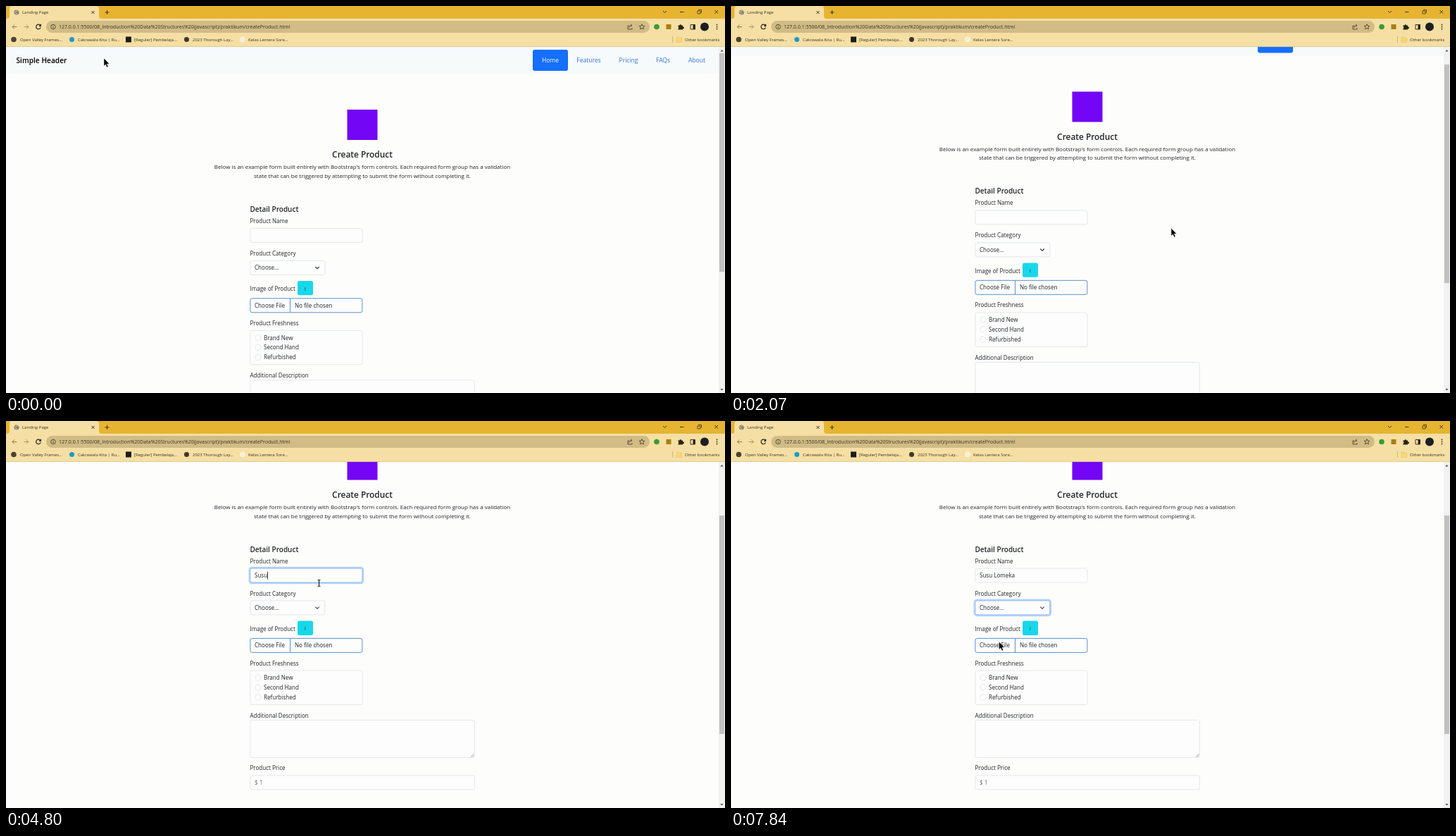
These frames come from a looping animation (1021x549 px, 8000 ms). An HTML page:

```html
<!DOCTYPE html>
<html lang="en">
<head>
<meta charset="utf-8">
<title>Landing Page</title>
<style>
html, body { margin: 0; width: 100%; height: 100%; overflow: hidden; background: #fdfdfb; }
svg { display: block; width: 100vw; height: 100vh; font: 8.05px "Open Sans", "Noto Sans", sans-serif; }
text { fill: #212529; white-space: pre; }
.mid { text-anchor: middle; }
.heading { font-weight: 600; }
.nav text { font-size: 8.55px; fill: #2f74dc; text-anchor: middle; }
.nav .active { fill: #fff; }
.field { fill: #fdfdfd; stroke: #dee2e6; stroke-width: .8; }
.ring { fill: none; stroke: #0d6efd; stroke-opacity: .28; stroke-width: 2.2; }
.edge { fill: none; stroke: #86b7fe; stroke-width: .8; }
.small text { font-size: 6px; fill: #3a3220; }
.icon { fill: none; stroke: #3f361f; stroke-width: 1; }
</style>
</head>
<body>
<svg viewBox="0 0 1021 549">
  <rect width="1021" height="549" fill="#fdfdfb"/>

  <g id="page">
    <rect y="58" width="1012" height="38" fill="#f6fafb"/>
    <text class="heading" x="14.5" y="81" font-size="10.2" style="fill:#000">Simple Header</text>
    <g class="nav">
      <rect x="748" y="62" width="50" height="30" rx="3" fill="#156ffa"/>
      <text class="active" x="773" y="80">Home</text>
      <text x="827.5" y="80">Features</text>
      <text x="884" y="80">Pricing</text>
      <text x="933" y="80">FAQs</text>
      <text x="981" y="80">About</text>
    </g>

    <rect x="484.5" y="147" width="43" height="43" fill="#7206f5"/>
    <text class="heading mid" x="506" y="215.3" font-size="11.9">Create Product</text>
    <text class="mid" x="506" y="231.3" font-size="8">Below is an example form built entirely with Bootstrap's form controls. Each required form group has a validation</text>
    <text class="mid" x="506" y="244" font-size="8">state that can be triggered by attempting to submit the form without completing it.</text>

    <text class="heading" x="346.5" y="292" font-size="10">Detail Product</text>
    <text x="346.5" y="308">Product Name</text>
    <rect class="field" x="346.8" y="315.4" width="159.2" height="20" rx="2.5"/>
    <g id="nameFocus">
      <rect class="ring" x="345.6" y="314.2" width="161.6" height="22.4" rx="3.5"/>
      <rect class="edge" x="346.8" y="315.4" width="159.2" height="20" rx="2.5"/>
    </g>
    <text id="typed" x="353" y="328.5"></text>
    <rect id="caret" y="320" width=".8" height="11" fill="#111"/>

    <text x="346.5" y="354">Product Category</text>
    <rect class="field" x="346.8" y="361.3" width="106" height="20" rx="2.5"/>
    <g id="selectFocus">
      <rect class="ring" x="345.6" y="360.1" width="108.4" height="22.4" rx="3.5"/>
      <rect class="edge" x="346.8" y="361.3" width="106" height="20" rx="2.5"/>
    </g>
    <text x="353" y="374.4">Choose...</text>
    <path d="M439.3 370l2.7 2.7 2.7-2.7" fill="none" stroke="#343a40" stroke-width="1.1"/>

    <text x="346.5" y="404.3">Image of Product</text>
    <rect x="414" y="390" width="22" height="20.3" rx="2.5" fill="#18d7ea"/>
    <text class="mid" x="425" y="403.6" font-size="7">i</text>
    <rect x="346.9" y="414.8" width="159" height="20" rx="2.5" fill="#fdfdfd" stroke="#4a84c4" stroke-width=".9"/>
    <path d="M403.5 415v19.6" stroke="#4a84c4" stroke-width=".9"/>
    <text x="353" y="427.8">Choose File</text>
    <text x="410" y="427.8">No file chosen</text>

    <text x="346.5" y="453">Product Freshness</text>
    <rect class="field" x="346.8" y="460.4" width="159.2" height="48.4" rx="2.5"/>
    <g class="field">
      <circle cx="358" cy="470.4" r="4.2"/>
      <circle cx="358" cy="484.3" r="4.2"/>
      <circle cx="358" cy="498.2" r="4.2"/>
    </g>
    <text x="366" y="473.5">Brand New</text>
    <text x="366" y="487.4">Second Hand</text>
    <text x="366" y="501.3">Refurbished</text>

    <text x="346.5" y="527.2">Additional Description</text>
    <rect class="field" x="346.8" y="530.8" width="318.6" height="53" rx="2.5"/>
    <path d="M660 583l4.5-4.5M662.5 583l2-2" stroke="#777" stroke-width=".7"/>
    <text x="346.5" y="601.8">Product Price</text>
    <rect class="field" x="346.8" y="609.3" width="318.6" height="20" rx="2.5"/>
    <text x="353" y="622.5" style="fill:#6c757d">$ 1</text>
  </g>

  <rect x="1012" y="58" width="9" height="491" fill="#f1f1f0"/>
  <rect id="thumb" x="1013" y="67" width="7" height="310" fill="#c0c0c0"/>
  <path d="M1014.3 64.500h4.400l-2.200-2.500zM1014.300 543h4.400l-2.200 2.500z" fill="#555"/>

  <g id="browser">
    <rect width="1021" height="18" fill="#e7b432"/>
    <path d="M1 18q4 0 4-4V4q0-4 4-4h119q4 0 4 4v10q0 4 4 4z" fill="#f5dfa4"/>
    <rect y="18" width="1021" height="40" fill="#f5dfa4"/>
    <path d="M0 57.600h1021" stroke="#d9c58e" stroke-width=".8"/>
    <rect x="57" y="21" width="857" height="17" rx="8.500" fill="#d1bc86"/>

    <g class="small">
      <circle cx="15" cy="9" r="3.600" fill="#85816f"/>
      <path d="M12 8q2 2 3-1t3 1M13 11h3" fill="none" stroke="#f5dfa4" stroke-width=".8"/>
      <text x="23" y="11.300">Landing Page</text>
      <text x="75" y="32" style="font-size:7px">127.0.0.1:5500/08_Introduction%20Data%20Structures%20(javascript)/praktikum/createProduct.html</text>
      <circle cx="11" cy="47.500" r="3.800" fill="#4a4232"/>
      <text x="20" y="50">Open Valley Frames...</text>
      <circle cx="93.500" cy="47.500" r="3.500" fill="#1a9cc4"/>
      <text x="102" y="50">Cakrawala Kita | Ru...</text>
      <rect x="170" y="43.500" width="8" height="8" fill="#1d1b17"/>
      <text x="182" y="50">[Reguler] Pembelaja...</text>
      <circle cx="256.500" cy="47.500" r="3.500" fill="#40382a"/>
      <text x="265" y="50">2023 Thorough Lay...</text>
      <circle cx="336" cy="47.500" r="4.200" fill="#f9efd2"/>
      <text x="344" y="50">Kelas Lentera Sore...</text>
      <path d="M946.500 43v9" stroke="#c6ae72" stroke-width=".8"/>
      <path d="M952 44h3l1 1h3.500v6.500H952z" fill="#f8d775" stroke="#e4bd50" stroke-width=".5"/>
      <text x="964" y="50">Other bookmarks</text>
    </g>

    <g class="icon">
      <path d="M121.500 7l4 4m0-4l-4 4M140.500 9h6m-3-3v6M933 7l2.500 2.500L938 7M957 8.500h5.500M1006.500 6l4.500 4.500m0-4.500l-4.500 4.500"/>
      <path d="M982 7h4v4h-4zM983.500 6.500v-1.200h4v4h-1.200" stroke-width=".8"/>
      <path d="M15.500 29.500H9m3-3l-3 3 3 3" stroke="#8d7b4c"/>
      <path d="M25.500 29.500H32m-3-3l3 3-3 3" stroke="#a9965f"/>
      <path d="M48.800 27.600a3.300 3.300 0 1 0 .4 2.800M49.400 25.800v2.500h-2.500" stroke="#211c10" stroke-width="1.200"/>
      <circle cx="67" cy="29.500" r="3.300" stroke-width=".8"/>
      <path d="M67 29v2.300M67 27.200v.8" stroke-width=".9"/>
      <path d="M885 28h-2v5h6v-2M884.500 31q.5-3.500 4-3.500m-1.500-1.800l2 1.800-2 1.800" stroke-width=".8"/>
      <path d="M903 25.700l1.100 2.500 2.700.2-2 1.800.6 2.700-2.400-1.400-2.400 1.400.6-2.700-2-1.800 2.700-.2z" stroke-width=".8"/>
      <path d="M972 26.500h6.500v6.500H972z"/>
    </g>
    <circle cx="924" cy="29.500" r="3.800" fill="#3b9a35"/>
    <rect x="937.500" y="26" width="7" height="7" fill="#a97f14"/>
    <path d="M954.500 27.500h2a1.300 1.300 0 1 1 2.600 0h2v2.200a1.300 1.300 0 1 1 0 2.400v1.400h-6.600v-1.800a1.300 1.300 0 0 0 0-2.500z" fill="#28220f"/>
    <path d="M975.500 26.500h3V33h-3z" fill="#28220f"/>
    <circle cx="992" cy="29.500" r="6" fill="#1d1e21"/>
    <g fill="#3f361f">
      <circle cx="1009.500" cy="26.500" r=".9"/>
      <circle cx="1009.500" cy="29.500" r=".9"/>
      <circle cx="1009.500" cy="32.500" r=".9"/>
    </g>
  </g>

  <g id="pointer">
    <path id="arrow" d="M0 0v11.200l2.500-2.300 1.800 4 1.900-.9-1.800-3.800h3.400z" fill="#000" stroke="#fff" stroke-width=".5"/>
    <path id="beam" d="M-1.800-4.500H-.5L0-4l.5-.5h1.300M0-4v8M-1.800 4.500H-.5L0 4l.5.500h1.300" fill="none" stroke="#000" stroke-width="1"/>
  </g>
</svg>
<script>
const LOOP = 8000;
const PRODUCT = "Susu Lomeka";
const KEY_TIMES = [4400, 4500, 4570, 4770, 4940, 5100, 5260, 5500, 5900, 6440, 6500];
// Each stop: time, x, y of the pointer's hot spot
const POINTER_PATH = [
  [20, 139, 74], [170, 214, 91], [1240, 214, 91], [1270, 216, 92.500], [1540, 625, 315],
  [2790, 625, 315], [3000, 444.500, 230], [7320, 444.500, 230], [7540, 402, 268],
  [7670, 386, 303], [7810, 386, 303], [7840, 380.500, 313]
];
const el = Object.fromEntries([...document.querySelectorAll("[id]")].map(e => [e.id, e]));

const clamp = v => Math.min(1, Math.max(0, v));
const progress = (t, from, to) => clamp((t - from) / (to - from));
const show = (node, visible) => node.setAttribute("visibility", visible ? "visible" : "hidden");
const move = (node, x, y) => node.setAttribute("transform", `translate(${x} ${y})`);

function pointerAt(t) {
  const next = POINTER_PATH.findIndex(stop => stop[0] > t);
  if (next === 0) return POINTER_PATH[0].slice(1);
  if (next < 0) return POINTER_PATH.at(-1).slice(1);
  const [t0, x0, y0] = POINTER_PATH[next - 1];
  const [t1, x1, y1] = POINTER_PATH[next];
  const p = progress(t, t0, t1);
  return [x0 + (x1 - x0) * p, y0 + (y1 - y0) * p];
}

function caretVisible(t) {
  if (t < 3870 || t >= 7520) return false;
  return t < 6970 || t >= 7470;
}

function draw(t) {
  const scroll = 100 * progress(t, 1970, 2170) ** 2 + 6.400 * progress(t, 2800, 2930);
  move(el.page, 0, -scroll);
  move(el.thumb, 0, scroll * .63);

  const typedCount = KEY_TIMES.filter(time => time <= t).length;
  el.typed.textContent = PRODUCT.slice(0, typedCount);
  el.caret.setAttribute("x", 353 + (typedCount ? el.typed.getComputedTextLength() : 0));
  show(el.caret, caretVisible(t));

  const toSelect = progress(t, 7520, 7670);
  el.nameFocus.setAttribute("opacity", progress(t, 3320, 3440) * (1 - toSelect));
  el.selectFocus.setAttribute("opacity", toSelect);

  const overInput = t >= 2970 && t < 7380;
  move(el.pointer, ...pointerAt(t));
  show(el.arrow, !overInput);
  show(el.beam, overInput);
}

function frame() {
  draw(performance.now() % LOOP);
  requestAnimationFrame(frame);
}
frame();
</script>
</body>
</html>
```
